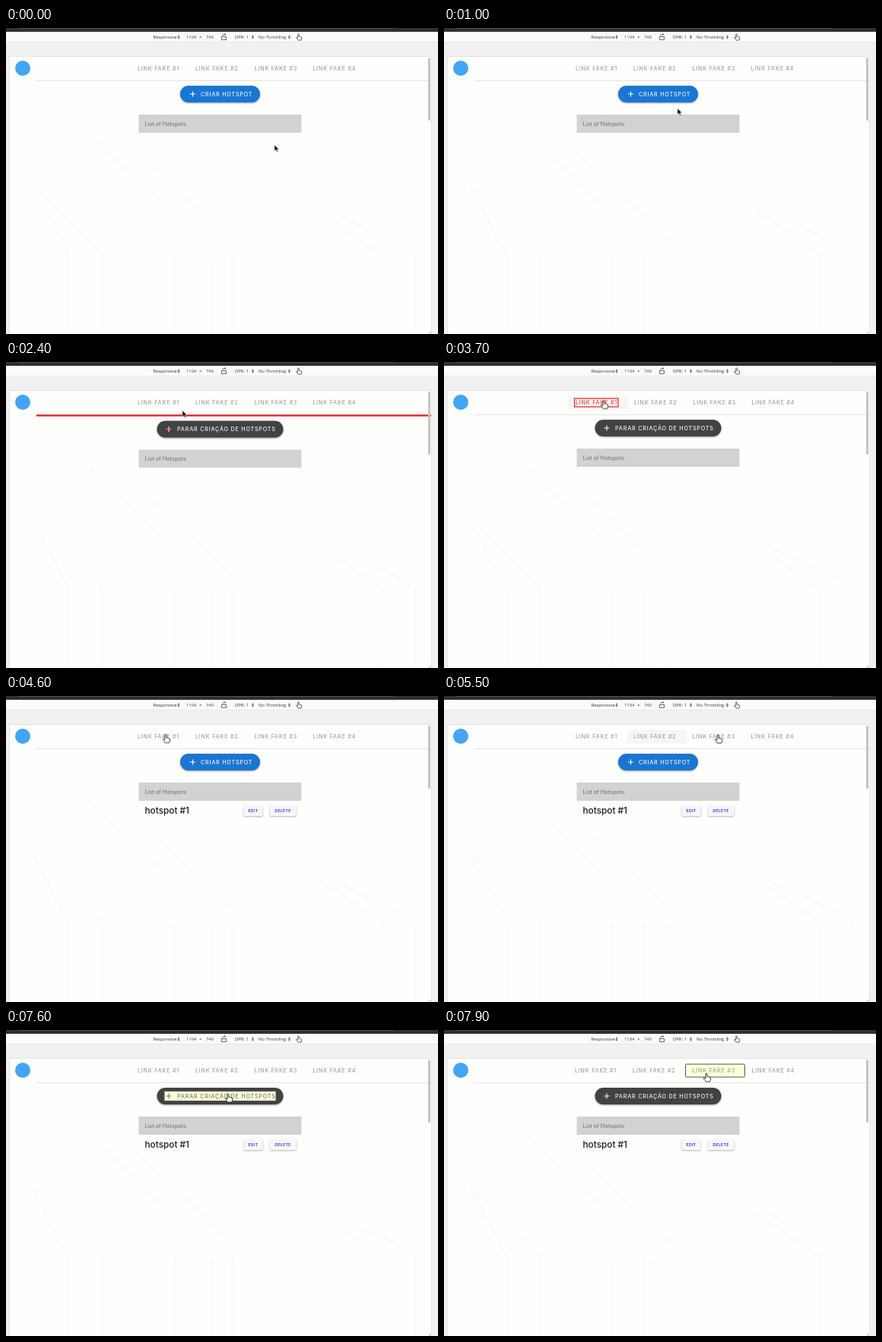
Animation, 568 px wide and 403 px high, one loop 8000 ms. Source, as an HTML page:

```html
<!DOCTYPE html>
<html lang="en">
<head>
<meta charset="utf-8">
<title>Hotspot demo</title>
<style>
html, body { margin: 0; width: 100%; height: 100%; overflow: hidden; background: #f1f1f1; }
svg { display: block; width: 100%; height: 100%; }
text { font-family: Inter, "Open Sans", sans-serif; font-weight: 500; white-space: pre; }
.bar text { font: 400 5.9px "Open Sans", "Noto Sans", sans-serif; fill: #333; }
.caps { font-size: 7.2px; letter-spacing: .78px; }
.nav { fill: #a0a0a0; }
.light { fill: #f4f4f4; }
.tiny { font-size: 4.9px; font-weight: 600; letter-spacing: .45px; fill: #2222ee; }
.card { fill: #f7f7f7; filter: drop-shadow(0 1px .8px rgba(0,0,0,.3)); }
.pill { filter: drop-shadow(0 1.3px 1.3px rgba(0,0,0,.4)); }
.plus { fill: none; stroke: #fff; stroke-width: 1.1; }
.deco { fill: none; stroke: #f5f5f3; stroke-width: 1; }
.grey { fill: #f6f6f6; }

/* 100 ms = 1.25% of the loop */
.a { animation: 8s step-end infinite; visibility: hidden; }
.move { animation: 8s step-end infinite; }

.blue { animation-name: blue; }
@keyframes blue { 0%, 50% { visibility: visible } 17.5%, 93.75% { visibility: hidden } }
.dark { animation-name: dark; }
@keyframes dark { 0%, 50% { visibility: hidden } 17.5%, 93.75% { visibility: visible } 100% { visibility: visible } }
.over { animation-name: over; }
@keyframes over { 0%, 17.5%, 93.75% { visibility: hidden } 15%, 90% { visibility: visible } }
.redlabel { animation-name: redlabel; }
@keyframes redlabel { 0%, 27.5% { visibility: hidden } 17.5% { visibility: visible } }
.ripple { animation-name: ripple; }
@keyframes ripple { 0%, 22.5% { visibility: hidden } 18.75% { visibility: visible } }
.yellowlabel { animation-name: yellowlabel; }
@keyframes yellowlabel { 0%, 96.25% { visibility: hidden } 95% { visibility: visible } }
.redplus { animation-name: redplus; }
@keyframes redplus { 0%, 32.5% { visibility: hidden } 27.5% { visibility: visible } }
.redline { animation-name: redline; }
@keyframes redline { 0%, 31.25% { visibility: hidden } 28.75% { visibility: visible } }
.yellowhead { animation-name: yellowhead; }
@keyframes yellowhead { 0%, 98.75% { visibility: hidden } 97.5% { visibility: visible } }
.item { animation-name: item; }
@keyframes item { 0% { visibility: hidden } 50%, 100% { visibility: visible } }
.grey1 { animation-name: grey1; }
@keyframes grey1 { 0%, 57.5% { visibility: hidden } 31.25% { visibility: visible } }
.red1 { animation-name: red1; }
@keyframes red1 { 0%, 50% { visibility: hidden } 31.25% { visibility: visible } }
.grey2 { animation-name: grey2; }
@keyframes grey2 { 0%, 70% { visibility: hidden } 61.25% { visibility: visible } }
.grey3 { animation-name: grey3; }
@keyframes grey3 { 0%, 75% { visibility: hidden } 70% { visibility: visible } }
.yellow3 { animation-name: yellow3; }
@keyframes yellow3 { 0% { visibility: hidden } 98.75%, 100% { visibility: visible } }

.body { animation-name: body; }
@keyframes body {
  0%, 31.25%, 98.75%, 100% { transform: none }
  28.75% { transform: translateY(1.5px) }
  97.5% { transform: translateY(1px) }
}
.n1 { animation-name: n1; }
@keyframes n1 { 0% { transform: none } 98.75%, 100% { transform: translateX(-1px) } }
.n2 { animation-name: n2; }
@keyframes n2 { 0%, 50% { transform: none } 31.25% { transform: translateX(1px) } 98.75%, 100% { transform: translateX(-1px) } }
.n3 { animation-name: n3; }
@keyframes n3 { 0%, 50% { transform: none } 31.25% { transform: translateX(1px) } }
.n4 { animation-name: n4; }
@keyframes n4 { 0%, 50% { transform: none } 31.25%, 98.75%, 100% { transform: translateX(1px) } }

.cursor { animation: 8s step-end infinite cursor; }
@keyframes cursor {
  0% { transform: translate(353px, 154px) }
  5% { transform: translate(353px, 154px); animation-timing-function: steps(9) }
  16.25% { transform: translate(284px, 82px) }
  26.25% { transform: translate(284px, 82px); animation-timing-function: steps(3) }
  30% { transform: translate(232px, 64px); animation-timing-function: steps(4) }
  35% { transform: translate(196px, 51px) }
  36.25% { transform: translate(196px, 51px); animation-timing-function: steps(4) }
  41.25% { transform: translate(205px, 51px) }
  42.5% { transform: translate(205px, 51px); animation-timing-function: steps(3) }
  46.25% { transform: translate(210px, 50.5px) }
  57.5% { transform: translate(210px, 50.5px); animation-timing-function: steps(9) }
  68.75% { transform: translate(360px, 51px) }
  70% { transform: translate(368px, 53px); animation-timing-function: steps(4) }
  75% { transform: translate(352px, 69px); animation-timing-function: steps(5) }
  81.25% { transform: translate(350px, 57px); animation-timing-function: steps(2) }
  83.75% { transform: translate(347px, 54px); animation-timing-function: steps(6) }
  91.25% { transform: translate(292px, 84px) }
  95% { transform: translate(292px, 84px); animation-timing-function: steps(3) }
  98.75%, 100% { transform: translate(345px, 57px) }
}
.arrow { animation-name: arrow; }
@keyframes arrow {
  0%, 28.75%, 73.75%, 86.25%, 96.25% { visibility: visible }
  15%, 31.25%, 78.75%, 90%, 98.75%, 100% { visibility: hidden }
}
.hand { animation-name: hand; }
@keyframes hand {
  0%, 28.75%, 73.75%, 86.25%, 96.25% { visibility: hidden }
  15%, 31.25%, 78.75%, 90%, 98.75%, 100% { visibility: visible }
}
</style>
</head>
<body>
<svg viewBox="0 0 568 403" preserveAspectRatio="none">
  <defs>
    <path id="plus" d="M-3.5 0h7M0-3.5v7"/>
    <path id="updown" d="M-1.6-.6L0-2.6 1.6-.6zM-1.6 .6L0 2.6 1.6 .6z" fill="#444"/>
    <path id="fist" d="M-1 1C-1-.3 1-.3 1 1V4.6C1.4 4 2.7 4.1 2.8 5 3.3 4.5 4.3 4.7 4.4 5.5 5 5.2 5.6 5.6 5.6 6.3V8.3C5.6 9.4 4.8 10 4.8 11H-.8C-1-10-2.4 8.8-3.6 7.2-4.3 6.2-3-5.4-2 6.4L-1 7.3Z"/>
    <path id="palm" d="M-1 1C-1-.3 1-.3 1 1V4.6C1.4 4 2.7 4.1 2.8 5C3.3 4.5 4.3 4.7 4.4 5.5C5 5.2 5.6 5.6 5.6 6.3V8.3C5.6 9.4 4.8 10 4.8 11H-.8C-1 10-2.4 8.8-3.6 7.2C-4.3 6.2-3 5.4-2 6.4L-1 7.3Z"/>
    <clipPath id="pillclip"><rect x="197" y="76" width="168.5" height="22" rx="11"/></clipPath>
  </defs>

  <!-- browser frame -->
  <rect width="568" height="403" fill="#f1f1f1"/>
  <rect width="568" height="5" fill="#332e2f"/>
  <rect x="16" width="494" height="1" fill="#554e50"/>
  <rect y="5" width="568" height="13.5" fill="#fbfbfb"/>
  <rect y="18" width="568" height=".7" fill="#e2e2e2"/>
  <g class="bar">
    <text x="193.5" y="14">Responsive</text><use href="#updown" x="227" y="12"/>
    <path d="M234.5 8.5h18v7h-18zM258.500 8.500h19v7h-19z" fill="#fff" stroke="#e6e6e6" stroke-width=".5"/>
    <text x="237" y="14">1104</text><text x="254" y="14">×</text><text x="263" y="14">740</text>
    <path d="M283.500 11.500h6v4h-6zM284.500 10.500q0-2 2.500-2h1.500M287.500 7.300l1.500 1.200-1.500 1.200" fill="none" stroke="#444" stroke-width=".8"/>
    <text x="301" y="14">DPR: 1</text><use href="#updown" x="324.500" y="12"/>
    <text x="332" y="14">No Throttling</text><use href="#updown" x="372.500" y="12"/>
    <use href="#palm" transform="translate(384.500 7.800) scale(.75)" fill="none" stroke="#444" stroke-width="1.100"/>
  </g>

  <!-- page -->
  <rect x="4.500" y="37.500" width="555" height="370" fill="#fefefd" stroke="#e2e2e2" stroke-width=".8"/>
  <path class="deco" d="M82.500 403V299L35 208M126.500 403V298L40 212M221.500 403V300M262.500 403V300M270.500 403V304M297.500 403V300M494.500 403V299L410 240M538.500 403V298M302 285L170 160M205 230L110 140M420 240L520 285"/>
  <rect x="40" y="69" width="519" height=".8" fill="#dcdcdc"/>
  <rect class="a yellowhead" x="4.500" y="38.500" width="554.500" height="31.500" fill="#ffffd8" stroke="#555"/>
  <rect class="a redline" x="40" y="69.300" width="519" height="2.300" fill="#ee1c1c"/>
  <circle cx="22" cy="53" r="10" fill="#42a5f5"/>

  <!-- navigation -->
  <rect class="a grey grey1" x="163" y="45" width="79" height="17.500"/>
  <rect class="a grey grey2" x="241" y="45" width="77.500" height="17.500"/>
  <rect class="a grey grey3" x="318" y="45" width="77.500" height="17.500"/>
  <rect class="a yellow3" x="317.500" y="45" width="78" height="17" rx="1.500" fill="#ffffd8" stroke="#555"/>
  <g class="caps nav">
    <text class="move n1" x="173" y="56">LINK FAKE #1</text>
    <text class="move n2" x="249" y="56">LINK FAKE #2</text>
    <text class="move n3" x="326.500" y="56">LINK FAKE #3</text>
    <text class="move n4" x="403.500" y="56">LINK FAKE #4</text>
  </g>
  <g class="a red1">
    <rect x="171.500" y="48" width="57.500" height="11" fill="#f6f6f6" stroke="#f02020" stroke-width="1.200"/>
    <text class="caps" x="173" y="56" fill="#e8443c">LINK FAKE #1</text>
  </g>

  <g class="move body">
    <g class="a blue">
      <rect class="pill" x="229" y="76" width="105" height="22" rx="11" fill="#1976d2"/>
      <rect class="a over" x="229" y="76" width="105" height="22" rx="11" fill="#fff" fill-opacity=".08"/>
      <use class="plus" href="#plus" x="245.500" y="87"/>
      <text class="caps light" x="256" y="89.600">CRIAR HOTSPOT</text>
    </g>
    <g class="a dark">
      <rect class="pill" x="198.500" y="76" width="166" height="22" rx="11" fill="#424242"/>
      <use class="plus" href="#plus" x="214" y="87"/>
      <text class="caps light" x="225" y="89.600">PARAR CRIAÇÃO DE HOTSPOTS</text>
    </g>
    <use class="a redplus plus" href="#plus" x="214" y="87" style="stroke:#f08078"/>
    <g class="a redlabel">
      <rect x="197" y="76" width="168.500" height="22" rx="11" fill="#484848"/>
      <rect class="a ripple" x="197" y="76" width="105" height="22" fill="#707070" clip-path="url(#pillclip)"/>
      <rect x="208" y="80.500" width="147" height="13" fill="#fdf3e6" stroke="#f03a2e" stroke-width=".9"/>
      <use class="plus" href="#plus" x="214" y="87" style="stroke:#ee2a20"/>
      <text class="caps" x="225" y="89.600" fill="#ee2a20">PARAR CRIAÇÃO DE HOTSPOTS</text>
    </g>
    <g class="a yellowlabel">
      <rect x="208" y="80.500" width="147" height="13" fill="#ffffd8" stroke="#555"/>
      <use class="plus" href="#plus" x="214" y="87" style="stroke:#777"/>
      <text class="caps" x="225" y="89.600" fill="#777">PARAR CRIAÇÃO DE HOTSPOTS</text>
    </g>

    <rect x="174.500" y="114" width="214" height="24" fill="#d2d2d1"/>
    <text x="182.500" y="128.600" font-size="7.250" fill="#7c7c7c">List of Hotspots</text>
    <g class="a item">
      <text x="182.500" y="155" font-size="11.800" fill="#1c1c1c">hotspot #1</text>
      <rect class="card" x="312.500" y="144" width="25" height="14" rx="2"/>
      <rect class="card" x="347" y="144" width="34.500" height="14" rx="2"/>
      <text class="tiny" x="318.500" y="152.800">EDIT</text>
      <text class="tiny" x="353.500" y="152.800">DELETE</text>
    </g>
  </g>

  <rect x="555" y="39" width="3" height="83" rx="1.500" fill="#c4c4c4"/>
  <path d="M556 403l3-3" stroke="#999" stroke-width=".8"/>

  <g class="cursor">
    <path class="a arrow" d="M0 0V8L1.900 6.300 3.200 9.200 4.500 8.600 3.300 5.800H5.800Z" fill="#111" stroke="#fff" stroke-width=".4"/>
    <use class="a hand" href="#palm" fill="#fff" stroke="#222" stroke-width=".9"/>
  </g>
</svg>
</body>
</html>
```
